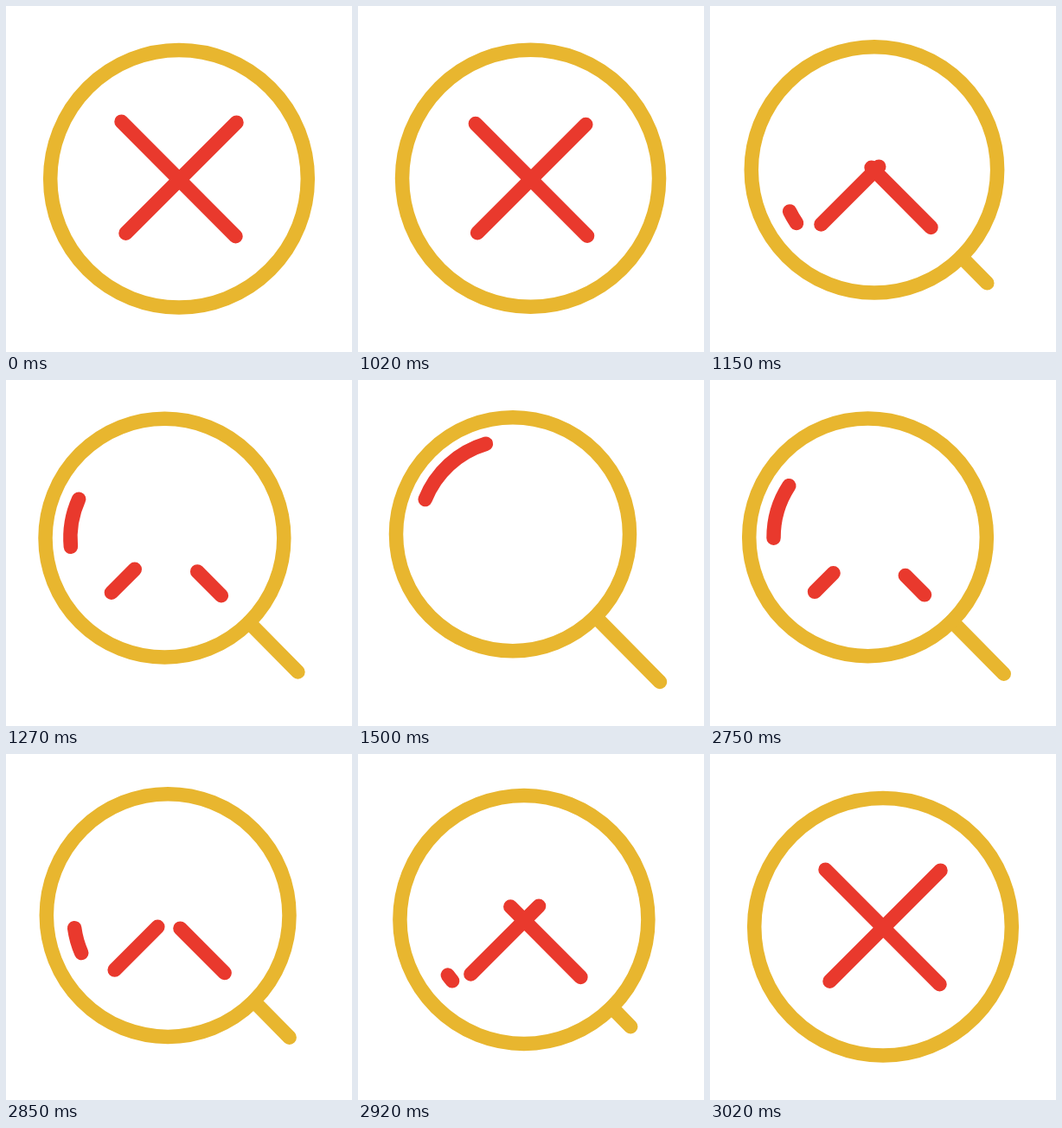
Recreate the animation shown at these times as an HTML page. Size 400 by 400 pixels, loop 3.05 s.

```html
<!DOCTYPE html>
<html lang="en">
<head>
<meta charset="utf-8">
<title>Close to search</title>
<style>
  html, body { margin: 0; height: 100%; overflow: hidden; background: #fff; }
  svg { display: block; width: 100%; height: 100%; }
  svg * { fill: none; stroke-width: 16.5; stroke-linecap: round; }
  .gold { stroke: #e8b62f; }
  .red { stroke: #e9392d; }
</style>
</head>
<body>
<svg viewBox="0 0 400 400">
  <path id="falling" class="red"/>
  <path id="rising" class="red"/>
  <path id="glint" class="red"/>
  <path id="handle" class="gold"/>
  <circle id="ring" class="gold"/>
</svg>
<script>
const LOOP = 3050, STEP = 25;
const part = id => document.getElementById(id);
const [falling, rising, glint, handle, ring] =
  ['falling', 'rising', 'glint', 'handle', 'ring'].map(part);

const mix = (a, b, p) => a + (b - a) * p;
const clamp = x => Math.min(1, Math.max(0, x));
const line = (x1, y1, x2, y2) => `M${x1} ${y1}L${x2} ${y2}`;

// 0 = close icon, 1 = magnifier; the motion advances in 25 ms steps
function morphAt(time) {
  const step = Math.floor((Math.floor(time / 10) * 10 + 5) / STEP);
  if (step < 41) return 0;
  const left = step < 102 ? 1 - (step - 40.8) / 19.2 : (step - 102) / 19;
  return 1 - clamp(left) ** 2.06;
}

function draw(time) {
  const p = morphAt(time);
  const cx = mix(200, 179, p), cy = mix(199.7, 178.2, p), r = mix(148.8, 135, p);
  ring.setAttribute('cx', cx);
  ring.setAttribute('cy', cy);
  ring.setAttribute('r', r);

  // Each stroke of the cross shrinks towards its lower end
  const stroke = (el, x1, y1, x2, y2) => {
    el.setAttribute('d', p < 1
      ? line(cx + mix(x1, x2, p), cy + mix(y1, y2, p), cx + x2, cy + y2) : '');
  };
  stroke(falling, -66.5, -66, 65.5, 66.5);
  stroke(rising, 66.5, -65, -61.5, 63);

  const rim = r * Math.SQRT1_2, tip = mix(294, 349, p);
  handle.setAttribute('d', tip > cx + rim ? line(cx + rim, cy + rim, tip, tip) : '');

  const onArc = degrees => {
    const a = degrees * Math.PI / 180;
    return [cx + 109 * Math.cos(a), cy + 109 * Math.sin(a)];
  };
  const tail = 126.3 + 8.3 * p + 67 * p * p;
  const head = 127.9 - 11 * p + 136.5 * p * p;
  glint.setAttribute('d', p > 0.05
    ? `M${onArc(tail)}A109 109 0 0 1 ${onArc(head)}` : '');
}

const start = performance.now();
function tick() {
  draw((performance.now() - start) % LOOP);
  requestAnimationFrame(tick);
}
tick();
</script>
</body>
</html>
```
